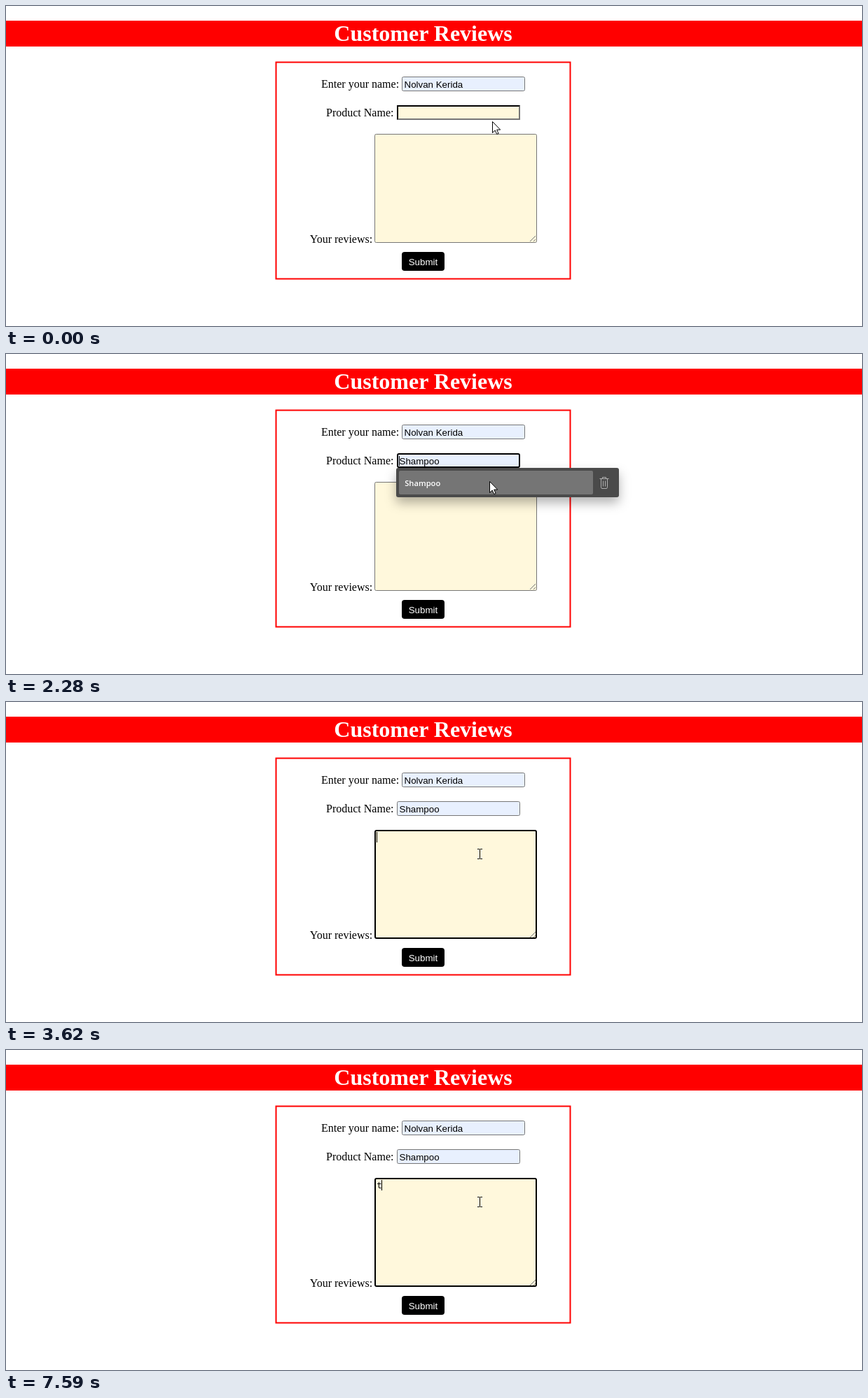
An HTML page for the animation above (8000 ms loop, 1222 by 458 pixels).

```html
<!DOCTYPE html>
<html lang="en">
<head>
<meta charset="utf-8">
<title>Customer Reviews</title>
<style>
  html, body { margin: 0; width: 100%; height: 100%; overflow: hidden; background: #fff; }
  svg { display: block; }
  text { white-space: pre; }
  .serif { font: 16px "Liberation Serif", serif; }
  .sans { font: 13.333px "Liberation Sans", sans-serif; }
  .mono { font: 12.2px "Noto Sans Mono", monospace; }
  .menu { font: 11.4px "Open Sans", sans-serif; fill: #fff; }
  .menu.bold { font-size: 11.2px; font-weight: 600; }
  .field { stroke: #767676; }
  .focused { stroke: #000; stroke-width: 2; }
  .cream { fill: #fff8dc; }
  .filled { fill: #e8f0fe; }
  #panel { filter: drop-shadow(0 8px 8px rgba(0, 0, 0, .3)); }
</style>
</head>
<body>
<svg width="1222" height="458" viewBox="0 0 1222 458">
  <rect y="21" width="1222" height="37" fill="red"/>
  <text x="595.5" y="50" text-anchor="middle" class="serif" style="font-size:32px;font-weight:bold" fill="#fff">Customer Reviews</text>
  <rect x="385.5" y="80.5" width="420" height="310" fill="none" stroke="red" stroke-width="2"/>

  <text x="450" y="117" class="serif">Enter your name:</text>
  <rect x="565.5" y="101.5" width="175" height="20" rx="2" class="field filled"/>
  <text x="568.5" y="117" class="sans">Nolvan Kerida</text>

  <text x="457" y="158" class="serif">Product Name:</text>
  <g id="inset">
    <rect x="558" y="142" width="176" height="21" fill="#767676"/>
    <path d="M558 163V142H734L732 144H560V161Z"/>
    <rect x="560" y="144" width="172" height="17" class="cream"/>
  </g>
  <rect id="product" rx="2"/>
  <text id="productText" x="561.5" y="158" class="sans">Shampoo</text>
  <rect id="productCaret" y="146" width="1" height="14"/>

  <text x="433.7" y="339" class="serif">Your reviews:</text>
  <rect id="review" rx="2"/>
  <path d="M748 337L756 329M753 337L756 334" stroke="#767676"/>
  <text id="reviewText" x="529.3" y="198" class="mono"></text>
  <rect id="reviewCaret" y="186" width="1" height="15"/>

  <rect x="565" y="352" width="61" height="27" rx="4"/>
  <text x="574.7" y="371" class="sans" fill="#fff">Submit</text>

  <g id="menu">
    <rect id="panel" x="557" y="163" width="318" height="42" rx="3" fill="#4a4a4a"/>
    <text id="option" x="569.2" y="189" class="menu">Shampoo</text>
    <g id="hover">
      <rect x="561" y="167" width="277" height="34" rx="2" fill="#757575"/>
      <text x="569.2" y="189" class="menu bold">Shampoo</text>
      <path d="M847.5 178.5H860.5M851.5 178V176.5H856.5V178M849.5 179V190.5Q849.5 192.5 851 192.5H857Q858.5 192.5 858.5 190.5V179M852.5 181.5V189.5M855.5 181.5V189.5"
        fill="none" stroke="#b0b0b0"/>
    </g>
  </g>

  <circle id="click" r="12" fill="#ff0" fill-opacity=".47"/>
  <path id="arrow" d="M0 0V16L3.7 12.5L6.2 18L8.6 17L6.2 11.6H11.2Z" fill="#fff" stroke="#000"/>
  <path id="beam" d="M-3.5 -7H-1Q0 -7 0 -6V6Q0 7 -1 7H-3.5M3.5 -7H1Q0 -7 0 -6V6Q0 7 1 7H3.5" fill="none" stroke="#000"/>
</svg>
<script>
const DURATION = 8000;
const WORD = "turned ";
const el = id => document.getElementById(id);
const show = (id, on) => el(id).style.display = on ? "" : "none";
const latest = (steps, t) => steps.findLast(step => step[0] <= t);
const during = (t, from, to) => t >= from && t < to;

function set(id, attributes) {
  for (const name in attributes) el(id).setAttribute(name, attributes[name]);
}

// Keeps the border inside the given box, thicker when focused.
function drawField(id, focused, fill, x, y, width, height) {
  const inset = focused ? 1 : .5;
  set(id, {
    class: `${focused ? "focused" : "field"} ${fill}`,
    x: x + inset, y: y + inset, width: width - 2 * inset, height: height - 2 * inset
  });
}

// time, shape, x, y
const pointer = [
  [0, "arrow", 694.5, 165.5], [70, "beam", 697.5, 163], [380, "beam", 699.5, 157],
  [450, "beam", 700.5, 154.5], [2100, "arrow", 696.5, 170.5], [2190, "arrow", 691.5, 179.5],
  [2280, "arrow", 690.5, 182.5], [2370, "arrow", 690.5, 183.5], [2830, "beam", 691.5, 185.5]
];

// start, end, x, y
const clicks = [[800, 990, 697.5, 153], [2590, 2740, 689, 184], [3430, 3620, 674, 216]];

// time, typed letters, caret visible
const typing = [
  [0, 0, 0], [3530, 0, 1], [4150, 0, 0], [4700, 0, 1], [4840, 1, 1], [4920, 2, 1],
  [5150, 3, 1], [5430, 4, 1], [5560, 5, 1], [5700, 6, 1], [6320, 7, 1], [6710, 7, 0],
  [7260, 6, 1], [7500, 3, 1], [7590, 1, 1]
];

function drawPointer(t) {
  let [, shape, x, y] = latest(pointer, t);
  if (t >= 3050) {
    const progress = Math.min(5, Math.floor((t - 3050) / 95) + 1) / 5;
    x -= 15 * progress;
    y += 32 * progress;
  }
  show("arrow", shape === "arrow");
  show("beam", shape === "beam");
  set(shape, { transform: `translate(${x} ${y})` });

  const click = clicks.find(([from, to]) => during(t, from, to));
  show("click", click);
  if (click) set("click", { cx: click[2], cy: click[3] });
}

function drawProduct(t) {
  const open = during(t, 1600, 2740);
  const hover = open && t >= 2100;
  show("inset", t < 1600);
  show("product", t >= 1600);
  drawField("product", t < 3530, t < 2100 ? "cream" : "filled", 558, 142, 176, 21);
  show("productText", t >= 2100);
  show("productCaret", during(t, 2100, 3530));
  set("productCaret", { x: open ? 561 : 619 });
  show("menu", open);
  show("option", !hover);
  show("hover", hover);
}

function drawReview(t) {
  const [, count, caret] = latest(typing, t);
  drawField("review", t >= 3530, "cream", 526, 183, 232, 156);
  el("reviewText").textContent = WORD.slice(0, count);
  show("reviewCaret", caret);
  set("reviewCaret", { x: 529 + Math.min(50, Math.round(count * 7.33)) });
}

function render(now) {
  const t = now % DURATION;
  drawProduct(t);
  drawReview(t);
  drawPointer(t);
}

const start = performance.now();
function tick() {
  render(performance.now() - start);
  requestAnimationFrame(tick);
}
tick();
</script>
</body>
</html>
```
